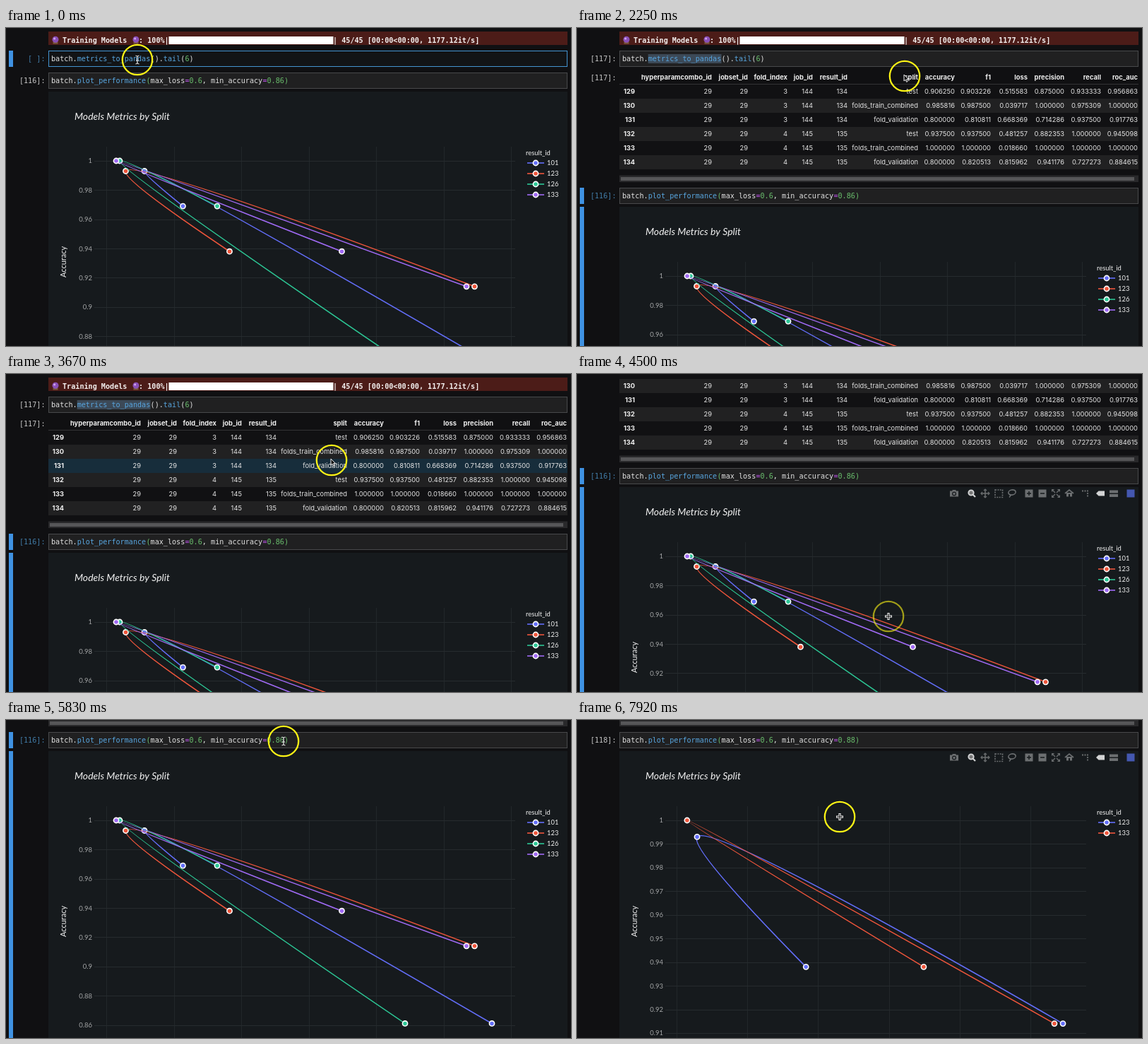
An HTML page with a canvas that plays this animation: 800x450 px, repeating every 8 s.

```html
<!DOCTYPE html>
<html lang="en">
<head>
<meta charset="utf-8">
<title>Notebook metrics</title>
<style>
html, body { margin: 0; width: 100%; height: 100%; overflow: hidden; background: #101012; }
canvas { display: block; width: 100vw; height: 100vh; }
</style>
</head>
<body>
<canvas id="stage" width="800" height="450"></canvas>
<script>
const ctx = document.getElementById('stage').getContext('2d');
const MONO = '"DejaVu Sans Mono", monospace', SANS = 'Inter, sans-serif', PLOT = 'Lato, sans-serif';
const BLUE = '#636efa', RED = '#ef553b', GREEN = '#2cc795', PURPLE = '#a06af5';
const CHAR = 6.11;

// Times in ms
const LOOP = 8000, SELECT = 500, RUN_TABLE = 1250, FOCUS = 5950, ERASE = 6250, TYPE = 6550, RUN_PLOT = 7250;

// Keyframes: [time, values...]
const pointerKeys = [[0, 186, 45], [1350, 186, 45], [2000, 464, 68], [2450, 464, 68], [3500, 461, 122],
  [3720, 461, 122], [4200, 441, 343], [5150, 441, 343], [5800, 393, 30], [7250, 393, 30], [7500, 388, 45], [7900, 372, 137]];
const ringKeys = [[0, 1], [4350, 1], [4500, .6], [4720, 0], [5130, 0], [5210, 1], [6050, 1], [6400, 0], [7300, 0], [7400, 1]];
const scrollKeys = [[4200, 0], [4500, 93], [4750, 182], [4960, 209]];

const COLUMNS = { hyperparamcombo_id: 191, jobset_id: 242, fold_index: 298, job_id: 334, result_id: 383, split: 483,
  accuracy: 535, f1: 586, loss: 638, precision: 690, recall: 742, roc_auc: 794 };
const METRICS = [
  'test 0.906250 0.903226 0.515583 0.875000 0.933333 0.956863',
  'folds_train_combined 0.985816 0.987500 0.039717 1.000000 0.975309 1.000000',
  'fold_validation 0.800000 0.810811 0.668369 0.714286 0.937500 0.917763',
  'test 0.937500 0.937500 0.481257 0.882353 1.000000 0.945098',
  'folds_train_combined 1.000000 1.000000 0.018660 1.000000 1.000000 1.000000',
  'fold_validation 0.800000 0.820513 0.815962 0.941176 0.727273 0.884615'
];
// Points are [x at the first zoom level, accuracy]
const SERIES = {
  101: [[250.5, .969], [196, .993], [688, .861]],
  123: [[316.5, .938], [169.5, .993], [663.5, .914]],
  126: [[299, .969], [161, 1], [565, .861]],
  133: [[475.5, .938], [156, 1], [652, .914]]
};

function keyed(keys, t, ease = u => u) {
  const next = keys.findIndex(k => k[0] > t);
  if (next === 0) return keys[0].slice(1);
  if (next < 0) return keys[keys.length - 1].slice(1);
  const a = keys[next - 1], b = keys[next], u = ease((t - a[0]) / (b[0] - a[0]));
  return a.slice(1).map((v, i) => v + (b[i + 1] - v) * u);
}
const smooth = u => u * u * (3 - 2 * u);

function rect(x, y, w, h, fill) { ctx.fillStyle = fill; ctx.fillRect(x, y, w, h); }

function text(str, x, midY, font, color, align = 'left') {
  ctx.font = font;
  ctx.fillStyle = color;
  ctx.textAlign = align;
  ctx.fillText(str, x, midY + parseFloat(font.match(/[\d.]+px/)[0]) * .36);
}

function line(points, color, width = 1) {
  ctx.beginPath();
  points.forEach(([x, y]) => ctx.lineTo(x, y));
  ctx.strokeStyle = color;
  ctx.lineWidth = width;
  ctx.stroke();
}

function circle(x, y, r, fill, stroke, width) {
  ctx.beginPath();
  ctx.arc(x, y, r, 0, 7);
  if (fill) { ctx.fillStyle = fill; ctx.fill(); }
  if (stroke) { ctx.strokeStyle = stroke; ctx.lineWidth = width; ctx.stroke(); }
}

function crystalBall(x, y) {
  rect(x - 3.5, y + 2.5, 7, 3, '#7a5a3c');
  circle(x, y - .7, 4.5, '#8a4fb8');
  circle(x - 1.3, y - 2, 1.5, '#d3a5ee');
}

function progressBar() {
  const font = `bold 10.15px ${MONO}`;
  rect(60, 5, 735, 19, '#4c1c18');
  crystalBall(70, 17);
  text('Training Models', 80, 17, font, '#f4f0ef');
  crystalBall(184, 17);
  text(': 100%|', 188, 17, font, '#f4f0ef');
  rect(230.5, 12, 233, 11, '#fff');
  text('| 45/45 [00:00<00:00, 1177.12it/s]', 463, 17, font, '#f4f0ef');
}

// Code is a list of [string, colour] pieces
function cell(y, prompt, active, focused, code) {
  const font = `10.15px ${MONO}`;
  rect(60, y, 735, 23, focused ? '#121416' : '#202021');
  ctx.strokeStyle = focused ? '#4393d0' : '#48494b';
  ctx.lineWidth = 1;
  ctx.strokeRect(60.5, y + .5, 734, 22);
  if (active) rect(4, y, 6, 23, '#3f92e2');
  text(prompt, 55.5, y + 11.5, font, active ? '#417ba6' : '#c4c4c4', 'right');
  let x = 64;
  for (const [str, color] of code) {
    text(str, x, y + 11.5, font, color);
    x += str.length * CHAR;
  }
}

const PLAIN = '#e2e2e2', NAME = '#58a6e0', NUMBER = '#69bd6c', OPERATOR = '#c255f0';

function metricsCell(t) {
  const ran = t >= RUN_TABLE;
  cell(32, ran ? '[117]:' : '[ ]:', !ran, !ran, []);
  if (t >= SELECT) rect(64 + 6 * CHAR, 37, 17 * CHAR, 13, '#3c4957');
  [['batch.', 0, PLAIN], ['metrics_to_pandas', 6, NAME], ['().', 23, PLAIN], ['tail', 26, NAME], ['(', 30, PLAIN],
    ['6', 31, NUMBER], [')', 32, PLAIN]].forEach(([str, col, color]) =>
    text(str, 64 + col * CHAR, 43.5, `10.15px ${MONO}`, color));
}

function metricsTable(pointerY) {
  const font = `9.35px ${SANS}`, bold = `bold 9.35px ${SANS}`;
  const edges = Object.values(COLUMNS);
  text('[117]:', 55.5, 70, `10.15px ${MONO}`, '#c4c4c4', 'right');
  Object.keys(COLUMNS).forEach((name, i) => text(name, edges[i], 69.5, bold, '#efefef', 'right'));
  METRICS.forEach((metrics, i) => {
    const y = 80 + i * 20, late = i > 2;
    const hovered = pointerY >= y && pointerY < y + 20;
    rect(60, y, 735, 20, hovered ? '#172d3b' : i % 2 ? '#212122' : '#111113');
    text(129 + i, 82, y + 10, bold, '#efefef', 'right');
    const ids = late ? [29, 29, 4, 145, 135] : [29, 29, 3, 144, 134];
    [...ids, ...metrics.split(' ')].forEach((v, c) => text(v, edges[c], y + 10, font, '#e4e4e4', 'right'));
  });
  rect(60, 79, 735, 1, '#343436');
  rect(60, 208.5, 735, 9.5, '#29292b');
  rect(62, 211, 727, 5, '#565658');
}

// Control point beside the middle of three points (Catmull-Rom, exponent 0.5)
function controls(a, m, b) {
  const d1 = [a[0] - m[0], a[1] - m[1]], d2 = [b[0] - m[0], b[1] - m[1]];
  const l1 = Math.hypot(...d1), l2 = Math.hypot(...d2), r1 = Math.sqrt(l1), r2 = Math.sqrt(l2);
  const num = [0, 1].map(i => l2 * d1[i] - l1 * d2[i]);
  return [m.map((v, i) => v + num[i] / (3 * r2 * (r1 + r2))), m.map((v, i) => v - num[i] / (3 * r1 * (r1 + r2)))];
}

function trace(points, color) {
  const [a, m, b] = points, [c1, c2] = controls(a, m, b);
  ctx.beginPath();
  ctx.moveTo(...a);
  ctx.quadraticCurveTo(...c1, ...m);
  ctx.quadraticCurveTo(...c2, ...b);
  ctx.strokeStyle = color;
  ctx.lineWidth = 1.6;
  ctx.stroke();
  points.forEach(([x, y]) => circle(x, y, 3.6, color, '#fff', 1.6));
}

function chart(top, filtered) {
  const zoom = filtered ? 1.0486 : 1, left = filtered ? 141.2 : 142;
  const perUnit = filtered ? 3344 : 2068, step = filtered ? .01 : .02;
  const toX = x => left + (x - 142) * zoom;
  const toY = accuracy => top + 98 + (1 - accuracy) * perUnit;
  rect(60, top, 735, 600, '#161a1d');
  text('Models Metrics by Split', 97, top + 34.5, `italic 14px ${PLOT}`, '#f2f2f2');

  for (let i = 0; i < 7; i++) {
    const x = Math.round(toX(142 + i * 95.5)) + .5;
    if (x < 721) line([[x, top + 78], [x, 460]], '#22272a');
  }
  for (let i = 0; i < 10; i++) {
    const y = toY(1 - i * step);
    line([[125, Math.round(y) + .5], [721, Math.round(y) + .5]], '#262b2e');
    text(+(1 - i * step).toFixed(2), 122, y, `9.5px ${PLOT}`, '#a3a5a6', 'right');
  }
  ctx.save();
  ctx.translate(81, top + 241);
  ctx.rotate(-Math.PI / 2);
  text('Accuracy', 0, 0, `11px ${PLOT}`, '#f2f2f2', 'center');
  ctx.restore();

  const ids = filtered ? [123, 133] : [101, 123, 126, 133];
  const colors = [BLUE, RED, GREEN, PURPLE];
  text('result_id', 736, top + 87, `9.4px ${PLOT}`, '#f2f2f2');
  ids.forEach((id, i) => {
    trace(SERIES[id].map(([x, a]) => [toX(x), toY(a)]), colors[i]);
    const y = top + 101 + i * 15;
    line([[738, y], [762, y]], colors[i], 1.6);
    circle(750, y, 3.6, colors[i], '#fff', 1.6);
    text(id, 766, y, `9.4px ${PLOT}`, '#f2f2f2');
  });
}

function toolbar(y) {
  const dim = '#6c6f71', lit = '#d2d3d4', dark = '#161a1d';
  rect(528, y - 3.5, 12, 8, dim);
  rect(531.5, y - 5, 5, 2, dim);
  circle(534, y + .5, 2.4, dim, dark, 1.2);

  circle(558, y - 1, 3.6, '#777', lit, 2);
  line([[560.5, y + 1.5], [564, y + 5]], lit, 2.2);

  line([[572.5, y], [583.5, y]], dim, 1.5);
  line([[578, y - 5.5], [578, y + 5.5]], dim, 1.5);
  for (const [dx, dy] of [[1, 0], [-1, 0], [0, 1], [0, -1]]) {
    const x = 578 + dx * 4, v = y + dy * 4;
    line([[x + dy * 2, v + dx * 2], [x + dx * 2, v + dy * 2], [x - dy * 2, v - dx * 2]], dim, 1.2);
  }

  ctx.setLineDash([2, 1.4]);
  ctx.strokeStyle = dim;
  ctx.lineWidth = 1.6;
  ctx.strokeRect(592, y - 5, 10.5, 10.5);
  ctx.setLineDash([]);

  ctx.beginPath();
  ctx.ellipse(616, y - 1.5, 5.2, 3.5, -.2, 0, 7);
  ctx.stroke();
  line([[612.5, y + 1], [614, y + 3], [612, y + 5.5]], dim, 1.4);

  for (const x of [640, 659]) {
    rect(x - 5.5, y - 5.5, 11, 11, dim);
    line([[x - 3, y], [x + 3, y]], dark, 1.5);
  }
  line([[640, y - 3], [640, y + 3]], dark, 1.5);

  for (const sx of [-1, 1]) for (const sy of [-1, 1]) {
    line([[678 + sx, y + sy], [678 + sx * 5, y + sy * 5]], dim, 1.3);
    line([[678 + sx * 2.5, y + sy * 5.3], [678 + sx * 5.3, y + sy * 5.3], [678 + sx * 5.3, y + sy * 2.5]], dim, 1.3);
  }

  line([[691, y], [697, y - 4.8], [703, y]], dim, 1.7);
  rect(693, y, 3, 4.5, dim);
  rect(698, y, 3, 4.5, dim);
  rect(693, y - 1, 8, 2, dim);

  ctx.setLineDash([2, 1.5]);
  line([[715, y - 3.5], [723, y - 3.5], [723, y + 5]], dim, 1.8);
  ctx.setLineDash([]);

  ctx.beginPath();
  [[735, y], [738.5, y - 3.5], [747, y - 3.5], [747, y + 3.5], [738.5, y + 3.5]].forEach(p => ctx.lineTo(...p));
  ctx.fillStyle = lit;
  ctx.fill();
  rect(754, y - 4.5, 12, 4, dim);
  rect(754, y + 1, 12, 4, dim);
  rect(778.5, y - 5.5, 11, 11, '#4457b0');
}

function pointer(x, y, kind, ringAlpha) {
  if (ringAlpha > 0) {
    ctx.globalAlpha = ringAlpha;
    circle(x, y, 21.2, null, '#fcf415', 2.3);
    ctx.globalAlpha = 1;
  }
  if (kind === 'arrow') {
    ctx.beginPath();
    [[0, 0], [0, 9], [2.1, 7.2], [3.6, 10.4], [5.1, 9.7], [3.7, 6.6], [6.5, 6.5]]
      .forEach(([dx, dy]) => ctx.lineTo(x - 1 + dx, y - 2 + dy));
    ctx.closePath();
    ctx.fillStyle = '#111';
    ctx.fill();
    ctx.strokeStyle = '#eee';
    ctx.lineWidth = 1;
    ctx.stroke();
  } else if (kind === 'cross') {
    for (const [color, width, r] of [['#eee', 3.2, 5], ['#222', 1.2, 4]]) {
      line([[x - r, y], [x + r, y]], color, width);
      line([[x, y - r], [x, y + r]], color, width);
    }
  } else {
    line([[x, y - 5], [x, y + 5]], '#ddd', 1.3);
    line([[x - 2.5, y - 6], [x, y - 5], [x + 2.5, y - 6]], '#ddd', 1.1);
    line([[x - 2.5, y + 6], [x, y + 5], [x + 2.5, y + 6]], '#ddd', 1.1);
    line([[x - 2, y + 1], [x + 2, y + 1]], '#ddd', 1.1);
  }
}

function draw(t) {
  const [px, py] = keyed(pointerKeys, t, smooth);
  const [scroll] = keyed(scrollKeys, t);
  const [ring] = keyed(ringKeys, t);
  const hasTable = t >= RUN_TABLE, rerun = t >= RUN_PLOT;
  const cellTop = 63 + (hasTable ? 163 : 0) - scroll, plotTop = cellTop + 27;
  const active = hasTable && !rerun, focused = t >= FOCUS && !rerun;
  const limit = t < ERASE ? '0.86' : t < TYPE ? '0.8' : '0.88';

  rect(0, 0, 800, 450, '#101012');
  ctx.save();
  ctx.translate(0, -scroll);
  progressBar();
  metricsCell(t);
  if (hasTable) metricsTable(py + scroll);
  ctx.restore();

  cell(cellTop, rerun ? '[118]:' : '[116]:', active, focused, [
    ['batch.', PLAIN], ['plot_performance', NAME], ['(', NUMBER], ['max_loss', PLAIN], ['=', OPERATOR], ['0.6', NUMBER],
    [', min_accuracy', PLAIN], ['=', OPERATOR], [limit, NUMBER], [')', NUMBER]]);
  if (focused) rect(64 + (50 + limit.length) * CHAR, cellTop + 5, 1, 13, '#ddd');
  chart(plotTop, rerun);
  if (active) rect(4, plotTop, 6, 450, '#3f92e2');

  const overPlot = py > plotTop && px > 60;
  const overCode = [cellTop, 32 - scroll].some(y => py >= y && py <= y + 23);
  if (overPlot) toolbar(plotTop + 9);
  pointer(px, py, overPlot ? 'cross' : overCode ? 'ibeam' : 'arrow', ring);
}

function tick() {
  const t = performance.now() % LOOP;
  draw(Math.floor((t + 5) * 12 / 1000) * 1000 / 12);
  requestAnimationFrame(tick);
}
tick();
</script>
</body>
</html>
```
